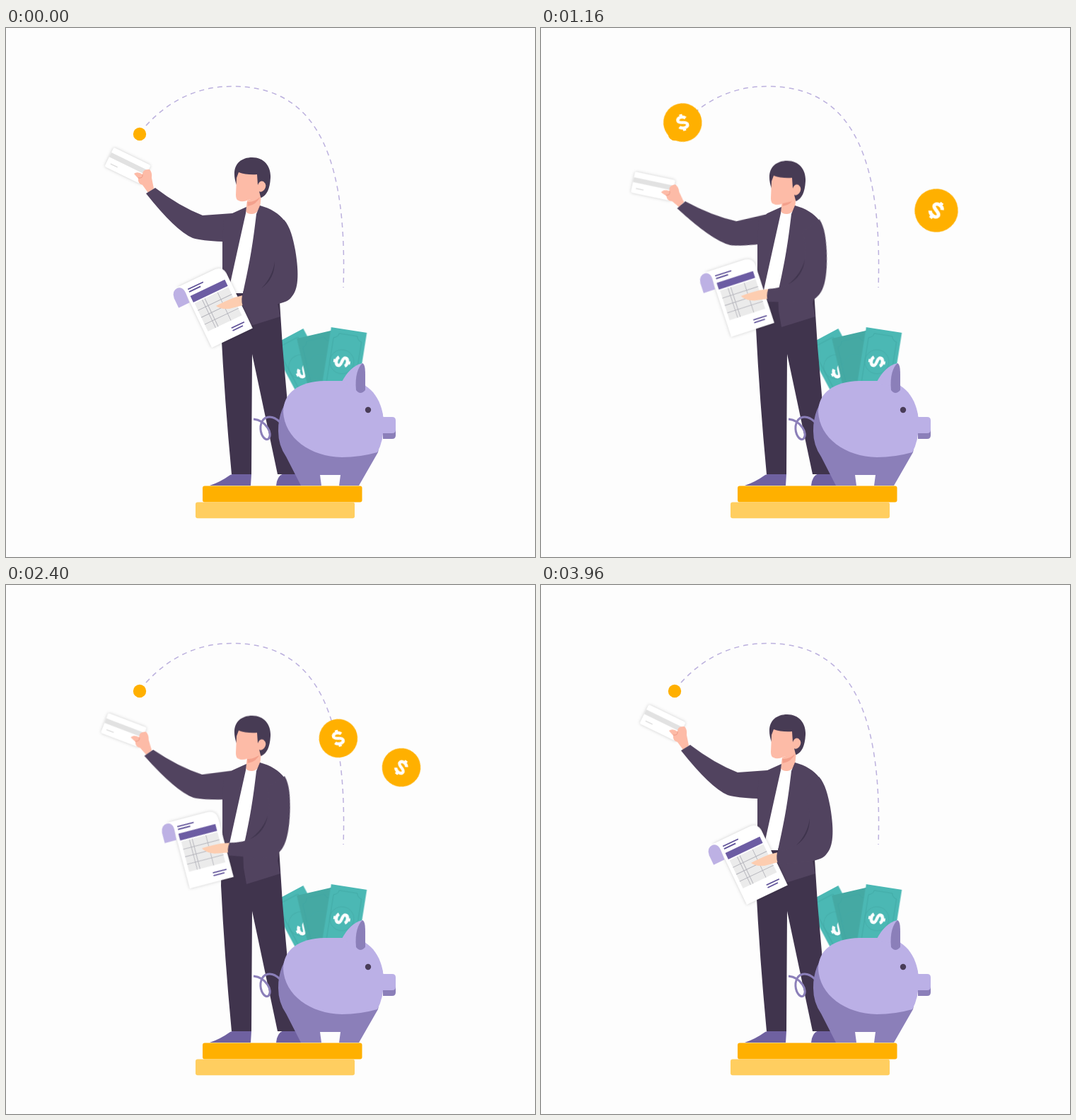
An HTML page for the animation above (4 s loop, 748 px wide and 748 px high).

```html
<!DOCTYPE html>
<html lang="en">
<head>
<meta charset="utf-8">
<title>Savings</title>
<style>
  html, body { margin: 0; width: 100%; height: 100%; overflow: hidden; background: #fdfdfd; }
  svg { display: block; width: 748px; height: 748px; }

  :root { --sine: cubic-bezier(.37, 0, .63, 1); }
  .jacket { fill: #51435f; }
  .pants { fill: #40344d; }
  .skin { fill: #fdbba7; }
  .light { fill: #bbb0e6; }
  .shade { fill: #8b7fb9; }
  .gold { fill: #ffb000; }
  .sheet { fill: #fff; filter: drop-shadow(0 0 2px #0003); }

  /* body sway */
  .head { animation: nod 1s var(--sine) infinite alternate; }
  .reach { transform-origin: 330px 280px; animation: reach 1s var(--sine) infinite alternate; }
  .wrist { transform-origin: 203px 228px; animation: wrist 1s var(--sine) infinite alternate; }
  .hold { transform-origin: 397px 276px; animation: hold 2s var(--sine) infinite alternate; }
  @keyframes nod { to { transform: translateY(5px); } }
  @keyframes reach { to { transform: rotate(-9.5deg); } }
  @keyframes wrist { to { transform: rotate(-5.5deg); } }
  @keyframes hold { to { transform: rotate(11.9deg); } }

  /* coin that follows the arc */
  .flyer {
    offset-path: path("M185 151C222 105 265 82 320 82C420 82 486 150 483 366");
    offset-rotate: 0deg;
    animation: fly 4s var(--sine) infinite, fade 4s linear infinite;
  }
  .flyer > g { animation: pop 4s ease-out infinite; }
  @keyframes fly {
    0%, 20.75% { offset-distance: 0%; }
    82%, 100% { offset-distance: 100%; }
  }
  @keyframes fade {
    0%, 66% { opacity: 1; }
    74.5%, 100% { opacity: 0; }
  }
  @keyframes pop {
    0%, 14% { transform: scale(0); }
    19% { transform: scale(1.2); animation-timing-function: ease-in-out; }
    24%, 100% { transform: scale(1); }
  }

  .still { animation: bounce 4s ease-in-out infinite; }
  @keyframes bounce {
    0%, 25% { transform: scale(0); animation-timing-function: ease-out; }
    30% { transform: scale(1.2); }
    35%, 81% { transform: scale(1); }
    85% { transform: scale(1.28); animation-timing-function: ease-in; }
    93%, 100% { transform: scale(0); }
  }

  .bill { animation: wag 4s var(--sine) infinite; }
  @keyframes wag {
    0%, 74% { transform: rotate(0deg); }
    82.5% { transform: rotate(13deg); }
    92%, 100% { transform: rotate(0deg); }
  }
</style>
</head>
<body>
<svg viewBox="0 0 748 748">
  <defs>
    <path id="dollar" d="M5.5-5C3-9-6-9-6-4C-6 1 6-1 6 4C6 9-3 9-6 5M0-12V-7M0 7V12"
      fill="none" stroke="#fff" stroke-width="4.3"/>
    <g id="coin">
      <circle class="gold" r="27.2"/>
      <use href="#dollar"/>
    </g>
    <g id="bill">
      <rect x="-25.5" y="-77" width="51" height="110"/>
      <path d="M-13-70H13Q14-64 20-63V10H-20V-63Q-14-64-13-70Z" fill="none" stroke="#3fa6a2" stroke-width=".8"/>
      <circle cx="-3" cy="-31" r="17" fill="none" stroke="#44aaa6" stroke-width=".8"/>
    </g>
  </defs>

  <!-- arc and coins -->
  <path d="M198 138C232 101 272 82.5 320 82.5C420 82.5 484 150 477 367" fill="none"
    stroke="#bcb1de" stroke-width="1.5" stroke-dasharray="7 6"/>
  <circle class="gold" cx="189" cy="150" r="9.2"/>
  <g class="flyer"><g><use href="#coin" transform="rotate(-15)"/></g></g>
  <g transform="translate(559 258)"><g class="still"><use href="#coin" transform="rotate(38)"/></g></g>

  <!-- banknotes -->
  <g fill="#4bb8b4">
    <g transform="translate(434 505)"><g class="bill"><g transform="rotate(-28)">
      <use href="#bill"/>
      <use href="#dollar" transform="translate(-2 -23) rotate(90)"/>
    </g></g></g>
    <g transform="translate(456 520)" fill="#45a9a3"><g class="bill"><g transform="rotate(-13)">
      <use href="#bill" y="-12"/>
    </g></g></g>
    <g transform="translate(473 503)"><g class="bill"><g transform="rotate(9)">
      <use href="#bill"/>
      <use href="#dollar" transform="translate(-3 -31) rotate(90)"/>
    </g></g></g>
  </g>

  <!-- legs -->
  <g fill="#6f61a0">
    <path d="M288 647Q303 642 317 632Q327 628 347 631L346 647Z"/>
    <path d="M382 647Q383 634 392 630H410L418 647Z"/>
  </g>
  <path class="pants" d="M305 372H386L391 450L398 530L411 631H384L348 461L347 631H319Q309 525 304 425Z"/>

  <!-- raised arm with card -->
  <g class="reach">
    <g class="wrist">
      <g transform="translate(172 195) rotate(26)">
        <rect class="sheet" x="-29" y="-15" width="58" height="30" rx="2"/>
        <path d="M-29-7H29V0H-29Z" fill="#e2e2e2"/>
        <path d="M-23 8H-12" stroke="#ddd" stroke-width="1.5"/>
      </g>
      <path class="skin" d="M201 233L193 222Q186 220 187 213L181 206Q186 202 193 207Q193 199 203 200Q207 204 206 212L209 227Z"/>
      <path d="M187 212Q194 213 193 207" fill="none" stroke="#ee9a86"/>
    </g>
    <path class="jacket" d="M198 234L211 226Q245 252 278 265L320 262L332 270L322 300L306 302Q277 301 264 297Q240 287 198 234Z"/>
  </g>

  <!-- torso -->
  <path d="M338 258Q347 266 356 258L352 300L335 375H314V300Z" fill="#fff"/>
  <path d="M341 244L361 236L359 255Q353 264 347 263Q341 263 339 259Z" class="skin"/>
  <path d="M341 246Q351 247 360 238Q354 250 342 252Z" fill="#f3a08c"/>
  <g class="jacket">
    <path d="M340 253L320 262L308 272L306 300V375H314Q328 311 339 262Z"/>
    <path d="M359 251C374 255 386 262 394 273L392 340L384 390L388 408Q366 415 340 423L336 400L335 375C346 325 349 305 354 263Z"/>
  </g>

  <!-- lower arm with receipt -->
  <g class="hold">
    <g transform="translate(291 452) rotate(-25.5)">
      <path class="sheet" d="M0 0V-82Q0-97-9-98H51Q64-98 64-84V0Z"/>
      <path d="M-18-71V-86Q-17-97-8-97Q0-96 0-86L-1-71Z" fill="#bdb1e4"/>
      <path d="M4-79H58V-69H4Z" fill="#6c5ca3"/>
      <path d="M5-67H58V-23H5Z" fill="#ebebeb"/>
      <path d="M5-56H58M5-45H58M5-34H58M17-67V-23M21-67V-23M41-67V-23" fill="none" stroke="#b3b3ba" stroke-width=".9"/>
      <path d="M5-89H29M5-85H23M37-13H57M37-9H53" fill="none" stroke="#5d4f97" stroke-width="1.7"/>
    </g>
    <path d="M335 378L323 381Q308 387 297 393Q303 398 316 397L335 392Z" fill="#fdcdb0"/>
    <path class="jacket" d="M372 290L393 271C402 281 406 298 409 314C415 350 413 370 404 380C396 391 380 391 336 396Q332 388 334 378Q354 374 363 366C374 357 380 345 380 322Z"/>
    <path d="M361 368Q380 355 380 330Q377 352 361 368Z" fill="#3f344d"/>
  </g>

  <!-- head -->
  <g class="head">
    <path d="M326 222C317 197 329 183 348 183C366 183 375 197 374 212C373 228 369 236 361 240L340 225Z" fill="#473b54"/>
    <path class="skin" d="M329 204Q340 208 355 207L356 222Q359 215 364 217Q370 222 365 229Q361 233 358 231L360 239Q352 241 343 243Q334 247 329 244Q325 243 325 236L326 212Z"/>
  </g>

  <!-- piggy bank -->
  <path d="M387 557C376 546 362 548 360 563C359 575 366 584 371 581C378 574 368 555 350 553" fill="none" stroke="#8b7fb9" stroke-width="3"/>
  <path d="M442 631H474V648H442Z" fill="#fdfdfd"/>
  <path class="shade" d="M385 570C385 525 415 500 455 500H480C515 504 534 530 534 560L526 600L499 647H471L473 632H444L446 647H417L396 606Q385 590 385 570Z"/>
  <path class="light" d="M392 543C392 515 415 500 450 499H488C518 502 534 530 534 560Q534 584 525 600Q500 607 475 607C430 606 394 580 392 543Z"/>
  <path class="shade" d="M533 560H551V576Q551 581 546 581H533Z"/>
  <path class="light" d="M530 550H546Q551 550 551 555V568Q551 573 546 573H530Z"/>
  <path class="light" d="M474 502Q486 478 504 474L502 508Z"/>
  <path class="shade" d="M495 512C493 492 498 479 504 474Q508 475 508 490V512Q501 520 495 512Z"/>
  <circle cx="512" cy="540" r="4.2" fill="#4a3d58"/>

  <!-- platform -->
  <rect class="gold" x="278" y="647.5" width="225.5" height="23" rx="3"/>
  <rect x="268" y="670.5" width="225" height="22.7" rx="3" fill="#ffce60"/>
</svg>
</body>
</html>
```
